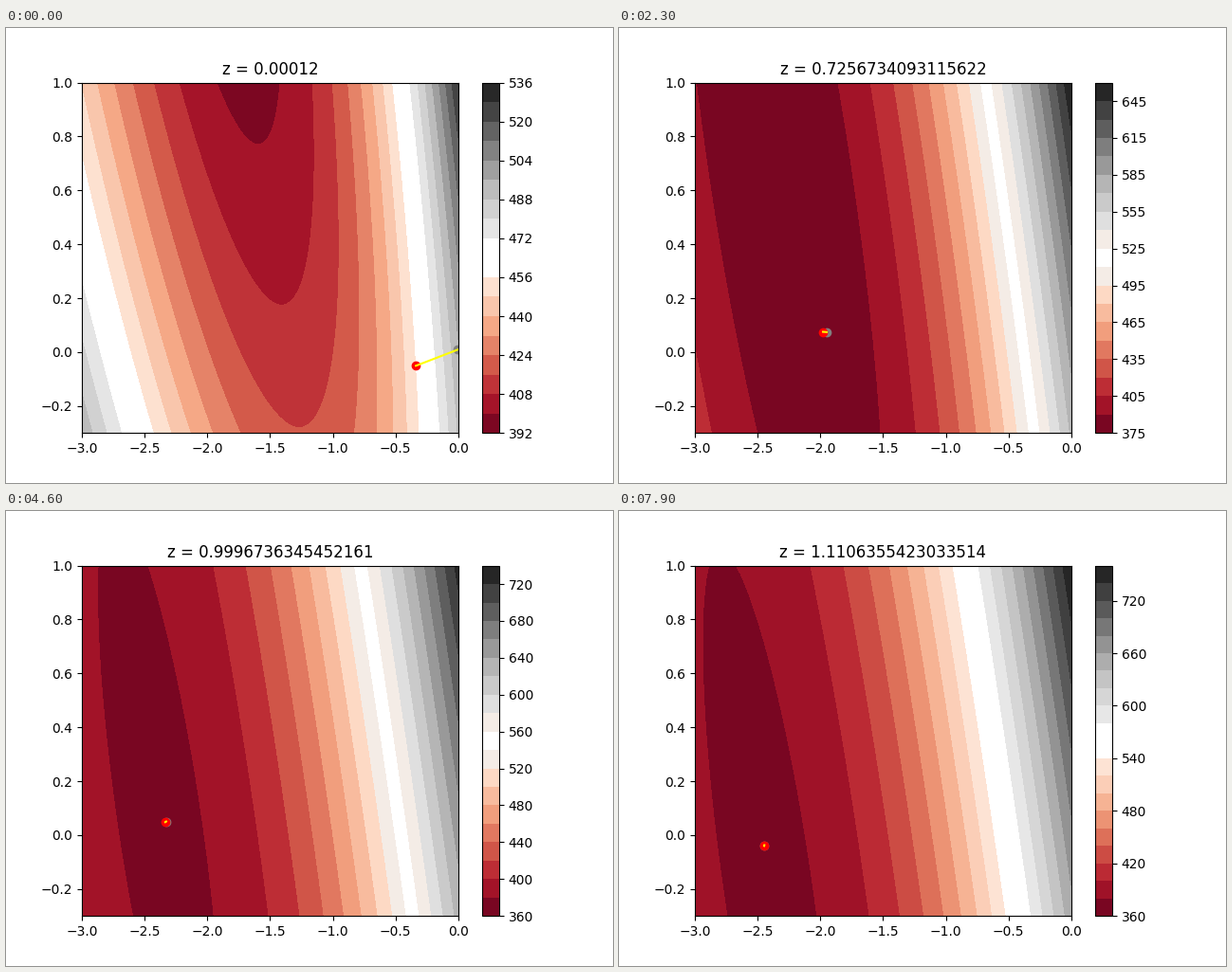
Animation, 640 px wide and 480 px high, one loop 8 s. Source, as a matplotlib script:

```python
import numpy as np
import matplotlib.pyplot as plt
from matplotlib.animation import FuncAnimation
from matplotlib.colors import ListedColormap, to_rgba

FRAMES = 80
RATE = 0.0025
XLIM, YLIM = (-3, 0), (-0.3, 1)


def pair(mean, spread):
    """Two sample points with the given mean and spread."""
    return np.array([mean - spread, mean + spread])


# Logistic regression on two groups; ages are in units of 100 years
MEN, WOMEN = 453, 261
SAVED_MEN, SAVED_WOMEN = 93, 197
MEAN_SAVED_AGE = 0.28344

weight = np.repeat([MEN / 2, WOMEN / 2], 2)
sex = np.repeat([1, 0], 2)
age = np.concatenate([pair(0.30727, 0.14678), pair(0.27916, 0.1411)])
features = np.array([sex, age, np.ones(4)])
saved = SAVED_MEN + SAVED_WOMEN
target = np.array([SAVED_MEN, saved * MEAN_SAVED_AGE, saved])


def loss(x, y, z):
    total = -(target[0] * x + target[1] * y + target[2] * z)
    for w, s, a in zip(weight, sex, age):
        total = total + w * np.logaddexp(0, z + s * x + a * y)
    return total


def descend(start, steps):
    path = [np.array(start)]
    for _ in range(steps):
        p = 1 / (1 + np.exp(-(path[-1] @ features)))
        path.append(path[-1] - RATE * (features @ (weight * p) - target))
    return np.array(path)


def white_centre(name, size=256):
    """A diverging map with a flat white middle and pale borders."""
    colors = plt.get_cmap(name)(np.linspace(0, 1, size))
    offset = abs(np.linspace(-0.5, 0.5, size))
    colors[offset < 0.065] = to_rgba("#f4ece6")
    colors[offset < 0.03] = to_rgba("white")
    return ListedColormap(colors)


path = descend([-0.004, 0.009, 0.00012], FRAMES)
cmap = white_centre("RdGy")
X, Y = np.meshgrid(np.linspace(*XLIM, 100), np.linspace(*YLIM, 100))

fig = plt.figure(figsize=(6.4, 4.8), dpi=100)
ax = fig.add_axes([0.125, 0.11, 0.62, 0.77])
old = ax.scatter([0], [0], color="gray")
new = ax.scatter([0], [0], color="red")
link, = ax.plot([], [], color="yellow")
title = ax.set_title("")
shown = []


def draw(i):
    while shown:
        shown.pop().remove()
    a, b = path[i], path[i + 1]
    z = float(a[2])

    field = ax.contourf(X, Y, loss(X, Y, z), 20, cmap=cmap, zorder=0.5)
    cax = fig.add_axes([0.78375, 0.11, 0.028875, 0.77])
    fig.colorbar(field, cax=cax)
    shown.extend([field, cax])

    ax.set(xlim=XLIM, ylim=YLIM)
    old.set_offsets([a[:2]])
    new.set_offsets([b[:2]])
    link.set_data([a[0], b[0]], [a[1], b[1]])
    title.set_text(f"z = {z}")
    return []


anim = FuncAnimation(fig, draw, frames=FRAMES, interval=100,
                     repeat=True, repeat_delay=0, blit=False)
plt.show()
```
